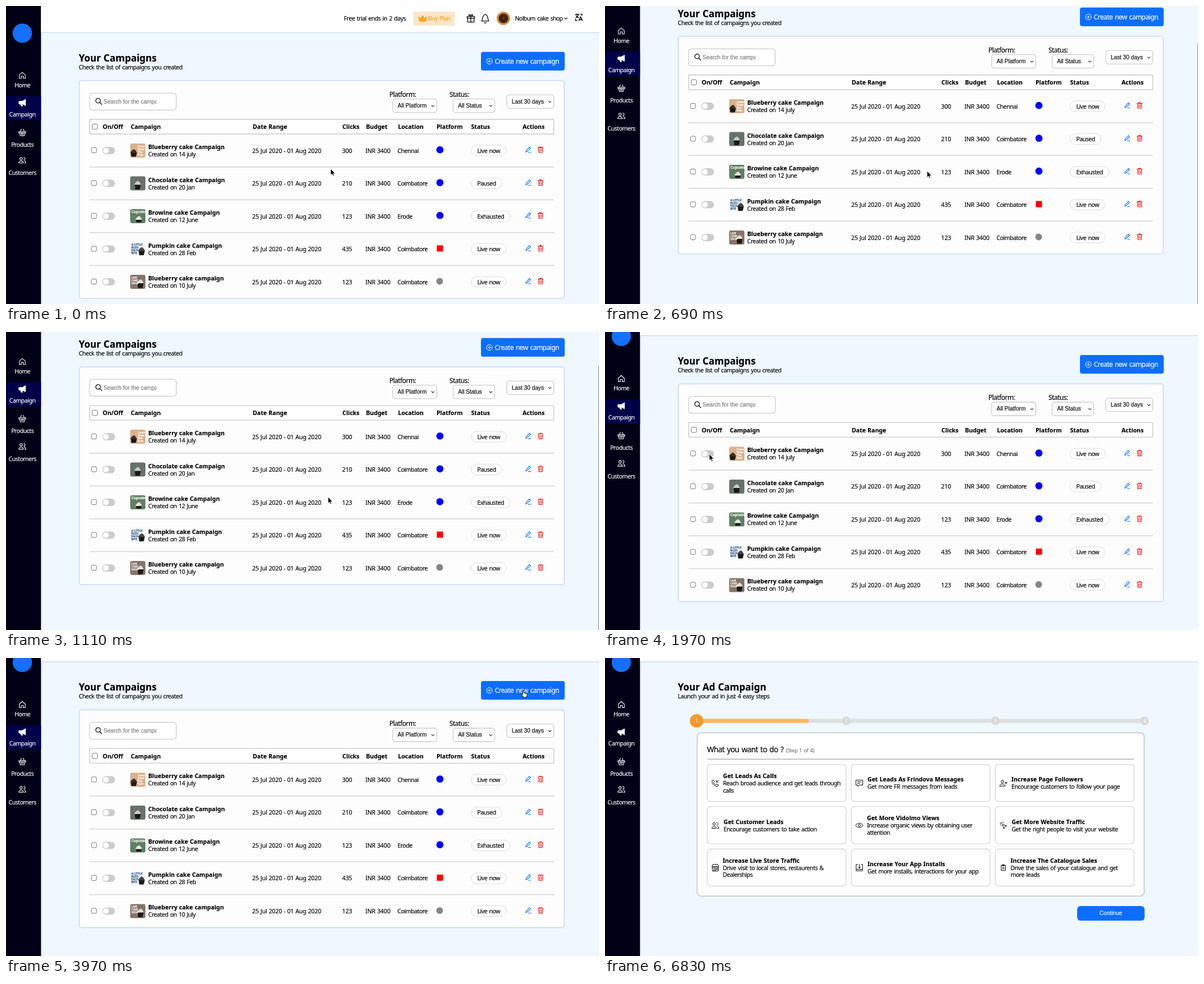
Animation of 1055 by 531 pixels, one loop 7.28 s. Source, as an HTML page:

```html
<!DOCTYPE html>
<html lang="en">
<head>
<meta charset="utf-8">
<title>Campaign dashboard</title>
<style>
html, body { margin: 0; width: 100%; height: 100%; overflow: hidden; background: #eff7ff; }
svg { display: block; width: 100%; height: 100%; font: 10.56px "Noto Sans", sans-serif; }
text { letter-spacing: -.045em; word-spacing: .1em; white-space: pre; fill: currentColor; stroke: currentColor; stroke-width: .15px; }
.bold { font-weight: 700; letter-spacing: 0; word-spacing: .03em; }
.num { letter-spacing: -.012em; word-spacing: .03em; }
.ui { font: 10.1px "Liberation Sans", Arial, sans-serif; letter-spacing: 0; word-spacing: 0; }
.mid { text-anchor: middle; }
</style>
</head>
<body>
<svg id="stage" viewBox="0 0 1055 531"></svg>
<script>
const LOOP = 7280, REST_SCROLL = 40.6;
const BLUE = '#0d6efd';

const ICONS = {
  home: 'M2 7.5 8 2 14 7.5V14.5H10V10H6V14.5H2Z',
  horn: 'M14.5 2V14L8.5 11H7.5L8.5 15H6L4.5 11H2.5A1.5 1.5 0 0 1 1 9.5V7A1.5 1.5 0 0 1 2.5 5.5H8Z',
  basket: 'M1 6.5H15V9H1ZM2.5 9 4 15H12L13.5 9M4 6 6.5 1M12 6 9.5 1M6 10V13M8 10V13M10 10V13',
  people: 'M8 5A2.5 2.5 0 1 1 3 5A2.5 2.5 0 1 1 8 5M1 14C1 8.5 10 8.5 10 14ZM10.5 2.6A2.5 2.5 0 1 1 10.5 7.4M11.5 9.5C14 9.5 15 11.5 15 14H12',
  gift: 'M1 4.5H15V7.5H1ZM2 7.5V15H14V7.5M8 4.5V15M8 4.5C3 4.5 4 0 6 1S8 4.5 8 4.5 8 2 10 1 13 4.5 8 4.5',
  bell: 'M2 12.5C4 10 3 2 8 1.5S12 10 14 12.5ZM6.5 14.5A1.5 1.5 0 0 0 9.5 14.5',
  crown: 'M0 4 4 8 8 2 12 8 16 4 14 14H2Z',
  translate: 'M1 3H9M5 1V3M2 9C5 8 7 6 7 3M3 5C4 7 6 8.5 8 9M8 15 11.5 7 15 15M9.2 12.5H13.8M11 2H14V5M2 11V14H5',
  plus: 'M15 8A7 7 0 1 1 1 8A7 7 0 1 1 15 8M8 4.5V11.5M4.5 8H11.5',
  search: 'M11.5 6.5A5 5 0 1 1 1.5 6.5A5 5 0 1 1 11.5 6.5M10.2 10.2 15 15',
  chevron: 'M4 6 8 10 12 6',
  pencil: 'M11 1.5 14 4.5 5 13 2 14 3 10.5ZM8 15H15',
  trash: 'M1.5 3.5H14.5M6 3.5V1.5H10V3.5M3 3.5 3.8 15H12.2L13 3.5M6.3 6V12.5M9.7 6V12.5',
  phone: 'M4 1.5 6 5 4.5 7C5 9 7 11 9 11.5L11 10 14.5 12 13 14.5C7 16 0 9 1.5 3ZM15 1 10 6M10 2V6H14',
  message: 'M1 2H15V12H8L5 15V12H1ZM4 5.5H12M4 8.5H9',
  follower: 'M9 5A2.8 2.8 0 1 1 3.4 5A2.8 2.8 0 1 1 9 5M.5 14C.5 8.5 11.5 8.5 11.5 14ZM13.5 5V10M11 7.5H16',
  eye: 'M.5 8C4 2 12 2 15.5 8 12 14 4 14 .5 8ZM10.3 8A2.3 2.3 0 1 1 5.7 8A2.3 2.3 0 1 1 10.3 8',
  click: 'M6 6 15 9 11 11 9 15ZM5 1V3.5M1 5H3.5M2 2 4 4M8.5 2 7.5 4M2 8.5 4 7.5',
  shop: 'M1 6 3 1.5H13L15 6ZM2 7V15H14V7M5 15V10H8V15M10 10H12V12H10ZM1 6C2 9 5 9 5.7 6 6.5 9 9.5 9 10.3 6 11 9 14 9 15 6',
  install: 'M5 1.5H1.5V14.5H14.5V1.5H11M8 1V9M5 6.5 8 9.5 11 6.5M1.5 11.5H14.5',
  clipboard: 'M3 2.5H13V15H3ZM6 1H10V4H6ZM5.5 8H10.5M5.5 11H10.5',
};

const text = (x, y, s, cls = '', attrs = '') => `<text x="${x}" y="${y}" class="${cls}" ${attrs}>${s}</text>`;
const rect = (x, y, w, h, r, fill, stroke = 'none', width = 1, attrs = '') =>
  `<rect x="${x}" y="${y}" width="${w}" height="${h}" rx="${r}" fill="${fill}" stroke="${stroke}" stroke-width="${width}" ${attrs}/>`;
const circle = (x, y, r, fill, attrs = '') => `<circle cx="${x}" cy="${y}" r="${r}" fill="${fill}" ${attrs}/>`;
const hline = (x1, x2, y, color, width) =>
  `<path d="M${x1} ${y}H${x2}" stroke="${color}" stroke-width="${width}"/>`;
// Icons live in a 16-unit box centred on (x, y).
const icon = (name, x, y, size, color = '#000', weight = 1, fill = 'none') => {
  const k = size / 16;
  return `<path transform="translate(${x - size / 2} ${y - size / 2}) scale(${k})" d="${ICONS[name]}" fill="${fill}"
    stroke="${color}" stroke-width="${weight / k}" stroke-linejoin="round"/>`;
};

function sidebar() {
  const items = [['home', 'Home', 123.3, 145], ['horn', 'Campaign', 172, 197],
    ['basket', 'Products', 225, 251], ['people', 'Customers', 274.5, 301.3]];
  return rect(0, 160.5, 62.3, 43, 0, '#00004a', 'none', 1, 'id="active"')
    + circle(29, 48.4, 17.2, '#166fff')
    + items.map(([name, label, iconY, y]) =>
      icon(name, 29, iconY, 14, '#fff', 1.1, name === 'horn' ? '#fff' : 'none')
      + text(29.2, y, label, 'mid', 'color="#fff"')).join('');
}

function topBar() {
  return rect(62.3, -10, 993, 57, 0, '#fff') + hline(62.3, 1055, 47.2, '#c4d7f5', 1.3)
    + text(601, 26, 'Free trial ends in 2 days')
    + rect(725, 10, 73.5, 25, 3, '#fae6c9')
    + icon('crown', 741, 22, 15, '#f9a61a', .5, '#f9a61a')
    + text(750.5, 26, 'Buy Plan', '', 'color="#f9a61a"')
    + icon('gift', 827, 22, 15, '#000', 1.3) + icon('bell', 852.5, 22, 17, '#000', 1.2)
    + circle(885, 22, 12, 'url(#avatar)')
    + text(905.5, 25.5, 'Nolbum cake shop', '', 'font-size="10.3"')
    + icon('chevron', 996, 22, 11, '#000', 1) + icon('translate', 1019, 20, 15, '#000', 1.5);
}

const THUMBNAILS = [
  { back: '#d9b08c', x: 6, y: 16, top: '#3a2c26', words: ['Come', 'Taste', 'The', 'Yum'], left: 13 },
  { back: '#66726a', x: 13, y: 14, top: '#c9cec8', words: [] },
  { back: '#5f7f62', x: 15, y: 18, top: '#ece6dd', words: ['Cupcakes'], size: 6.3 },
  { back: '#f4f6f8', x: 20, y: 15, top: '#4a4644', words: ['A LITTLE', 'BLISS', 'EACH', 'BITE'], ink: '#1d4f80' },
  { back: '#857469', x: 18, y: 14, top: '#e4ded5', words: ['LIVE', 'CAKE', 'SHOP'] },
];

function thumbnail({ back, x, y, top, words, left = 2, size = 4.7, ink = '#fff' }) {
  return rect(0, 0, 27, 25, 3, back)
    + `<path d="M${x - 5} ${y}H${x + 6}L${x + 4} 23.5H${x - 4}Z" fill="#191817"/>`
    + `<path d="M${x - 6} ${y + 1}Q${x - 4} ${y - 4} ${x + 1} ${y - 6}Q${x + 5} ${y - 3} ${x + 6} ${y + 1}Z" fill="${top}"/>`
    + words.map((w, i) => text(left, 6.5 + i * 5, w, 'bold', `font-size="${size}" color="${ink}"`)).join('');
}

function campaignRow([name, created, clicks, place, platform, status], i) {
  const y = 257.5 + 58.5 * i;
  const pill = { 'Live now': 62.5, Paused: 55, Exhausted: 69.5 }[status];
  const mark = [circle(772, y - 1.3, 6.4, '#0505ee'), rect(766.5, y - 6.5, 11, 11, 0, '#f00'), circle(771.5, y - 1, 6, '#858585')][platform];
  return rect(152, y - 5, 9, 9, 2, '#fff', '#777')
    + rect(171.3, y - 6.5, 22.6, 13, 6.5, '#ccc', 'none', 1, `id="track${i}"`)
    + circle(177.8, y, 5, '#fff', `id="knob${i}"`)
    + `<g transform="translate(221 ${y - 12.5})">${thumbnail(THUMBNAILS[i])}</g>`
    + text(253, y - 2.5, name, 'bold') + text(253, y + 10.6, 'Created on ' + created)
    + text(438, y + 4, '25 Jul 2020 - 01 Aug 2020', 'num')
    + text(598, y + 4, clicks, 'num') + text(639.5, y + 4, 'INR 3400', 'num') + text(696.5, y + 4, place)
    + mark
    + rect(827.5, y - 9.5, pill, 19, 9.5, '#fff', '#dcdcdc')
    + text(827.5 + pill / 2, y + 4, status, 'mid')
    + icon('pencil', 929, y - 1.5, 11.5, BLUE, 1.1) + icon('trash', 951, y - 1.5, 12, '#f01414', 1.1)
    + (i < 4 ? hline(148.5, 975, y + 29.3, '#d9d9d9', 1.8) : '');
}

function select(x, y, w, label) {
  return rect(x, y, w, 24, 4, '#fff', '#ccc', 1.3) + text(x + 8.7, y + 15.5, label, 'ui')
    + icon('chevron', x + w - 7, y + 12.3, 10, '#333', 1.2);
}

function campaignPage() {
  const headings = [[172, 'On/Off'], [222, 'Campaign'], [439, 'Date Range'], [598.5, 'Clicks'], [640.5, 'Budget'],
    [697.5, 'Location'], [766, 'Platform'], [827.5, 'Status'], [919, 'Actions']];
  const rows = [
    ['Blueberry cake Campaign', '14 july', 300, 'Chennai', 0, 'Live now'],
    ['Chocolate cake Campaign', '20 Jan', 210, 'Coimbatore', 0, 'Paused'],
    ['Browine cake Campaign', '12 June', 123, 'Erode', 0, 'Exhausted'],
    ['Pumpkin cake Campaign', '28 Feb', 435, 'Coimbatore', 1, 'Live now'],
    ['Blueberry cake campaign', '10 July', 123, 'Coimbatore', 2, 'Live now'],
  ];
  return text(129.5, 98.5, 'Your Campaigns', 'bold', 'font-size="17"')
    + text(129.5, 112.7, 'Check the list of campaigns you created')
    + rect(845, 81.7, 149, 33.2, 4, BLUE) + icon('plus', 860, 98.5, 11.5, '#fff', 1)
    + text(869.5, 103, 'Create new campaign', '', 'font-size="12" color="#fff"')
    + rect(130.5, 133, 862.7, 388, 4, '#fdfdfe', '#c8dbf8', 1.6)
    + rect(148.8, 155.3, 154, 30, 5, '#fff', '#ccc', 1.3)
    + icon('search', 165, 170, 13, '#000', 1.3)
    + text(173.5, 173.8, 'Search for the campa', 'ui', 'color="#757575" clip-path="url(#searchClip)"')
    + text(682, 162, 'Platform:', '', 'font-size="12"') + text(789, 162, 'Status:', '', 'font-size="12"')
    + select(688, 165.6, 78.5, 'All Platform') + select(795.5, 165.6, 74, 'All Status') + select(891, 158.3, 83.5, 'Last 30 days')
    + rect(148.8, 202, 825.7, 26, 1, '#fff', '#c9c9c9', 1.4)
    + rect(153.3, 210.3, 9.4, 9.4, 2, '#fff', '#777')
    + headings.map(([x, s]) => text(x, 219.2, s, 'bold')).join('')
    + rows.map(campaignRow).join('');
}

function wizardPage() {
  const goals = [
    ['phone', 210, 'Get Leads As Calls', 'Reach broad audience and get leads through', 'calls'],
    ['message', 467, 'Get Leads As Frindova Messages', 'Get more FR messages from leads'],
    ['follower', 723, 'Increase Page Followers', 'Encourage customers to follow your page'],
    ['people', 211, 'Get Customer Leads', 'Encourage customers to take action'],
    ['eye', 466, 'Get More Vidolmo Views', 'Increase organic views by obtaining user', 'attention'],
    ['click', 723.5, 'Get More Website Traffic', 'Get the right people to visit your website'],
    ['shop', 209.5, 'Increase Live Store Traffic', 'Drive visit to local stores, restaurents &amp;', 'Dealerships'],
    ['install', 467, 'Increase Your App Installs', 'Get more installs, interactions for your app'],
    ['clipboard', 721.5, 'Increase The Catalogue Sales', 'Drive the sales of your catalogue and get', 'more leads'],
  ];
  const goal = ([name, x, ...lines], i) => {
    const left = 182 + 256.2 * (i % 3), top = 189.7 + 75.3 * Math.floor(i / 3);
    const first = top + (lines.length > 2 ? 24.3 : 30.7);
    return rect(left, top, 247, 66, 6, '#fff', '#d3d3d3', 1.2)
      + icon(name, left + 14.3, top + 33.2, name === 'clipboard' ? 12 : 14)
      + lines.map((s, n) => text(x, first + n * 12.9, s, n ? '' : 'bold')).join('');
  };
  return text(129.5, 58, 'Your Ad Campaign', 'bold', 'font-size="17"')
    + text(129.5, 72, 'Launch your ad in just 4 easy steps')
    + rect(163, 108.5, 797, 7, 3.5, '#dedede') + rect(163, 108.5, 199.5, 7, 3, '#fbb55f')
    + [163, 429, 694.5, 960].map((x, i) => circle(x, 112, i ? 7.5 : 12, i ? '#d8d8d8' : '#f39a2d')
      + text(x, 115.2, i + 1, 'mid num', 'font-size="9" color="#fff"')).join('')
    + rect(164, 133.3, 795.3, 291, 7, '#fff', '#c4c4c4', 1.5)
    + text(181.5, 167.8, 'What you want to do ?', '', 'font-size="13.6"')
    + text(322, 167.5, '(Step 1 of 4)', '', 'font-size="9.5" color="#777"')
    + hline(182, 941.5, 180.2, '#8d8d8d', 1.1)
    + goals.map(goal).join('')
    + rect(840, 442, 120, 26, 6, BLUE) + text(900, 458.3, 'Continue', 'ui mid', 'color="#fff"');
}

const $ = id => document.getElementById(id);
$('stage').innerHTML = `
  <defs>
    <clipPath id="searchClip"><rect x="170" y="160" width="98" height="20"/></clipPath>
    <radialGradient id="avatar"><stop offset="0" stop-color="#7d4a2c"/><stop offset=".25" stop-color="#3c1d12"/>
      <stop offset=".65" stop-color="#4a2514"/><stop offset=".8" stop-color="#d5a054"/><stop offset="1" stop-color="#c68d45"/></radialGradient>
  </defs>
  ${rect(0, 0, 1055, 531, 0, '#eff7ff')}${rect(0, 0, 62.3, 531, 0, '#000017')}
  <g id="page">${sidebar()}${topBar()}<g id="campaigns">${campaignPage()}</g></g>
  <g id="wizard">${wizardPage()}</g>
  ${rect(1054, 0, 1, 475, 0, '#858585', 'none', 1, 'id="scrollbar"')}
  <g id="cursor">
    <path id="arrow" d="M0 0V11.5L2.6 9.1 4.4 13 6.2 12.2 4.5 8.4H8Z" fill="#000" stroke="#fff" stroke-width=".8"/>
    <path id="hand" transform="translate(-3.2 0)" d="M3 1C3-.5 5-.5 5 1V5L10 6.2C11 6.7 11.2 8 10.8 9.3L9.7 13H4.5L1 8.5C.3 7.4 1.5 6.6 2.3 7.4L3 8.2Z" fill="#fff" stroke="#000"/>
  </g>`;

const clamp = v => Math.min(1, Math.max(0, v));
const smooth = p => p * p * (3 - 2 * p);
const ramp = (t, from, to) => clamp((t - from) / (to - from));
const mix = (a, b, p) => a + (b - a) * p;

// Each key is [time, ...values]; values ease from one key to the next.
function track(keys, t, ease) {
  const next = keys.findIndex(k => k[0] > t);
  if (next < 0) return keys.at(-1).slice(1);
  if (next === 0) return keys[0].slice(1);
  const a = keys[next - 1], b = keys[next], p = ease(ramp(t, a[0], b[0]));
  return a.slice(1).map((v, i) => mix(v, b[i + 1], p));
}

const SCROLL = [[395, 0], [510, 49], [690, 79], [870, 79], [930, 78], [1580, REST_SCROLL]];
const POINTER = [[0, 577.5, 290], [119.9, 577.5, 290], [120, 573, 294], [1590, 573, 294], [1970, 185.5, 217.5],
  [3480, 185.5, 217.5], [3970, 919.5, 57], [5470, 919.5, 57], [5650, 869, 400], [6320, 869, 400], [6830, 978, 535]];

const show = (id, visible) => $(id).setAttribute('visibility', visible ? 'visible' : 'hidden');

function draw(t) {
  const scroll = track(SCROLL, t, t > 930 ? smooth : p => p)[0];
  $('page').setAttribute('transform', `translate(0 ${-scroll})`);

  const wizardOpen = t >= 4660;
  show('campaigns', !wizardOpen);
  show('active', !wizardOpen);
  show('wizard', wizardOpen);

  $('scrollbar').setAttribute('y', scroll * .85);
  $('scrollbar').setAttribute('opacity', t < 400 ? 0 : 1 - ramp(t, 1700, 1960));

  const on = smooth(ramp(t, 2880, 3180)) - smooth(ramp(t, 3480, 3780));
  const grey = [204, 204, 204], active = [33, 150, 243];
  $('track0').setAttribute('fill', `rgb(${grey.map((c, i) => Math.round(mix(c, active[i], on)))})`);
  $('knob0').setAttribute('cx', 177.8 + 9.6 * on);

  const [x, y] = track(POINTER, t, smooth);
  $('cursor').setAttribute('transform', `translate(${x} ${y})`);
  const pointing = (t >= 2720 && t < 3500) || (t >= 3900 && t < 5470);
  show('hand', pointing);
  show('arrow', !pointing);
}

const start = performance.now();
function frame() {
  draw((performance.now() - start) % LOOP);
  requestAnimationFrame(frame);
}
frame();
</script>
</body>
</html>
```
